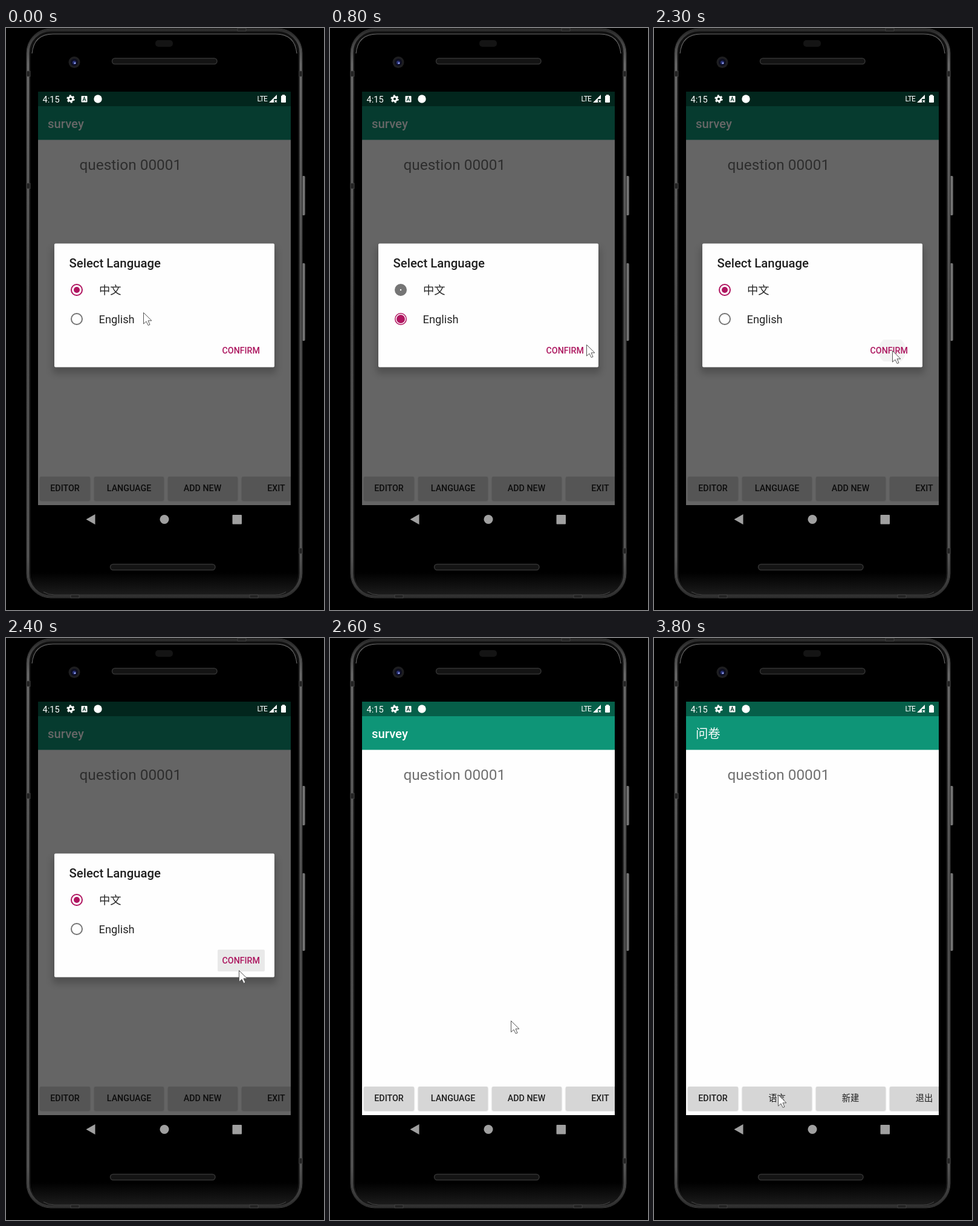
Write an HTML page that moves like this. It is 526x960 px and loops after 3.9 s.

```html
<!DOCTYPE html>
<html lang="en">
<head>
<meta charset="utf-8">
<title>Language dialog</title>
<style>
html, body { margin: 0; width: 100%; height: 100%; overflow: hidden; background: #000; }
svg { display: block; width: 526px; height: 960px; font-family: Roboto, "Noto Sans CJK SC", "Noto Sans CJK", sans-serif; }
.medium { font-weight: 500; }
#buttons text { font-size: 14.25px; font-weight: 500; text-anchor: middle; fill: #1f1f1f; }
#buttons.zh text:not(:first-of-type) { font-weight: 400; }
</style>
</head>
<body>
<svg viewBox="0 0 526 960">
  <defs>
    <linearGradient id="metal" x2="0" y2="1">
      <stop offset="0" stop-color="#2c2c2c"/><stop offset=".06" stop-color="#686868"/>
      <stop offset=".5" stop-color="#4c4c4c"/><stop offset=".93" stop-color="#555"/><stop offset="1" stop-color="#303030"/>
    </linearGradient>
    <linearGradient id="chin" x2="0" y2="1">
      <stop offset="0" stop-color="#000"/><stop offset="1" stop-color="#1b1b1b"/>
    </linearGradient>
    <linearGradient id="key" x2="1" y2="0">
      <stop offset="0" stop-color="#303030"/><stop offset=".5" stop-color="#858585"/><stop offset="1" stop-color="#444"/>
    </linearGradient>
    <clipPath id="screen"><path d="M53 105h418v682H53z"/></clipPath>
    <clipPath id="confirmArea"><rect x="350" y="514" width="78" height="36" rx="2"/></clipPath>
    <filter id="blur" x="-20%" y="-20%" width="140%" height="150%"><feGaussianBlur stdDeviation="6"/></filter>
    <filter id="soft" x="-10%" y="-20%" width="120%" height="150%"><feGaussianBlur stdDeviation="1"/></filter>
  </defs>

  <!-- phone body -->
  <rect x="489.500" y="244" width="5.500" height="65" rx="2" fill="url(#key)"/>
  <rect x="489.500" y="388" width="5.500" height="128" rx="2" fill="url(#key)"/>
  <rect x="34" y="1" width="456" height="939" rx="40" fill="#101010" stroke="#3a3a3a"/>
  <rect x="36.500" y="3.500" width="451" height="934" rx="38" fill="none" stroke="url(#metal)" stroke-width="4"/>
  <rect x="40" y="9" width="444" height="926" rx="36" fill="#000" stroke="#1c1c1c"/>
  <path d="M43 42Q46 10 78 10H446Q478 10 481 42" fill="none" stroke="#6c6c6c" stroke-width="1.200"/>
  <path d="M42 898H483Q482 934 448 934H77Q43 934 42 898" fill="url(#chin)"/>
  <path d="M62 930Q70 935 80 935H445Q456 935 463 930" fill="none" stroke="#484848"/>
  <path d="M34 71h6v9h-6zM34 256h6v9h-6zM485 71h5v9h-5zM485 858h5v9h-5zM383 0h14v5h-14zM107 935h14v5h-14zM403 935h14v5h-14z" fill="#242424" stroke="#4b4b4b" stroke-width=".7"/>
  <rect x="247" y="20" width="29" height="11" rx="5" fill="#141414"/>
  <g fill="#141414" stroke="#333" stroke-width="1.500">
    <rect x="175.500" y="50" width="173.500" height="9.500" rx="4.700"/>
    <rect x="172.500" y="884.500" width="173.500" height="9.500" rx="4.700"/>
  </g>
  <circle cx="113" cy="56.500" r="9.500" fill="#1e1e20"/>
  <circle cx="113" cy="56.500" r="6" fill="#0d0e20"/>
  <circle cx="113" cy="57" r="3" fill="#2a3378"/>
  <circle cx="114" cy="58" r="1.300" fill="#a9b5ff"/>
  <g fill="#a0a0a0">
    <path d="M132.500 810.500L147.500 802V819z"/>
    <circle cx="262" cy="810.500" r="7.500"/>
    <rect x="374.500" y="803" width="15.500" height="15.500" rx="1"/>
  </g>

  <!-- app -->
  <g clip-path="url(#screen)">
    <path d="M53 105h418v682H53z" fill="#fefefe"/>
    <path d="M53 105h418v24H53z" fill="#065f49"/>
    <path d="M53 129h418v55.500H53z" fill="#0e9577"/>
    <text id="title" class="medium" x="69" y="164.500" font-size="20.350" fill="#fff"></text>
    <text x="121.500" y="234" font-size="24.400" fill="#707070">question 00001</text>
    <g id="buttons"></g>
    <path id="dim" d="M53 105h418v682H53z"/>
  </g>

  <!-- status icons -->
  <g fill="#fff">
    <text x="60.500" y="122.500" font-size="14.600">4:15</text>
    <circle cx="107" cy="117" r="3.600" fill="none" stroke="#fff" stroke-width="3"/>
    <circle cx="107" cy="117" r="5.600" fill="none" stroke="#fff" stroke-width="2.200" stroke-dasharray="2.930"/>
    <rect x="124.500" y="112" width="10" height="10.500" rx="1"/>
    <path d="M127 120.500L129.500 114L132 120.500M128 118.500h3" fill="none" stroke="#123c30" stroke-width="1.200"/>
    <circle cx="152" cy="117" r="6.700"/>
    <text x="415.500" y="121" font-size="12" letter-spacing="-.7">LTE</text>
    <path d="M435 123L448 110V117H443V123z"/>
    <path d="M444.500 119l3.500 3.500m0-3.500l-3.500 3.500" stroke="#fff" stroke-width="1.200"/>
    <path d="M457 111.500V110h4v1.500h1q1 0 1 1V122q0 1-1 1h-6q-1 0-1-1v-9.500q0-1 1-1z"/>
  </g>

  <!-- dialog -->
  <g id="dialog">
    <rect x="77" y="362" width="370" height="208" rx="4" opacity=".2" filter="url(#blur)"/>
    <rect x="80" y="355.500" width="364" height="204" rx="2" fill="#fefefe"/>
    <text class="medium" x="104.500" y="394.500" font-size="20.350" fill="#1f1f1f">Select Language</text>
    <g font-size="18.300" fill="#252525">
      <text x="154" y="439">中文</text>
      <text x="153.500" y="486.500">English</text>
    </g>
    <g id="radios"></g>
    <g clip-path="url(#confirmArea)"><circle id="ripple" cx="394" cy="532" fill="#e9e9e9"/></g>
    <text class="medium" x="357.500" y="537" font-size="14.250" fill="#ad1860">CONFIRM</text>
  </g>

  <path id="cursor" d="M.5.5V19L5 15L8.200 21.500L11 20.300L8 13.800H14z" fill="#fff" stroke="#555"/>
</svg>
<script>
const LOOP = 3900, TICK = 100;
const PINK = '#b01560', GRAY = '#757575';
const $ = id => document.getElementById(id);

function add(parent, tag, attrs) {
  const el = document.createElementNS('http://www.w3.org/2000/svg', tag);
  return set(parent.appendChild(el), attrs);
}
function set(el, attrs) {
  for (const name in attrs) el.setAttribute(name, attrs[name]);
  return el;
}

// left, width, text centre, English label, Chinese label
const buttons = [
  [56, 83, 97.5, 'EDITOR', 'EDITOR'],
  [146, 115, 203.5, 'LANGUAGE', '语言'],
  [268, 115, 325, 'ADD NEW', '新建'],
  [390, 115, 447, 'EXIT', '退出']
].map(([x, width, centre, en, zh]) => {
  const box = { x, width, height: 39, rx: 2 };
  add($('buttons'), 'rect', { ...box, y: 741, opacity: .25, filter: 'url(#soft)' });
  add($('buttons'), 'rect', { ...box, y: 740, fill: '#d6d6d6' });
  return { label: add($('buttons'), 'text', { x: centre, y: 764 }), en, zh };
});

const radios = [432, 480].map(cy => ({
  ring: add($('radios'), 'circle', { cx: 117, cy, fill: 'none' }),
  dot: add($('radios'), 'circle', { cx: 117, cy })
}));

// [ring thickness, dot radius] on successive ticks
const CHECK = [[2, 0], [7, 0], [1.5, 7], [2, 5]];
const UNCHECK = [[2, 5], [2, 7], [8.8, 0], [5, 0], [2, 0]];

function drawRadio({ ring, dot }, checked, step) {
  const poses = checked ? CHECK : UNCHECK;
  const [width, radius] = poses[Math.min(step, poses.length - 1)];
  const color = checked ? (step ? PINK : GRAY) : (step < 2 ? PINK : GRAY);
  set(ring, { r: 10 - width / 2, 'stroke-width': width, stroke: color });
  set(dot, { r: radius, fill: color });
}

// time, x, y of the pointer tip
const path = [
  [0, 227, 469], [300, 224, 474], [400, 262, 483], [500, 350, 500], [600, 413, 515],
  [800, 424, 522], [1000, 424, 523], [1200, 411, 537], [1300, 260, 490], [1400, 128, 443],
  [1700, 128, 443], [1800, 132, 444], [1900, 190, 465], [2000, 300, 505], [2100, 388, 538],
  [2300, 394, 532], [2400, 385, 548], [2500, 354, 584], [2600, 299, 631], [2700, 285, 643],
  [3100, 286, 643], [3200, 262, 678], [3300, 228, 715], [3400, 209, 732], [3500, 209, 732],
  [3800, 205, 753]
];

function pointer(t) {
  const i = path.findIndex(p => p[0] >= t);
  if (i < 1) return path[0].slice(1);
  const a = path[i - 1], b = path[i], k = (t - a[0]) / (b[0] - a[0]);
  return [1, 2].map(n => a[n] + (b[n] - a[n]) * k);
}

function draw(t) {
  const zh = t >= 2900;
  $('title').textContent = zh ? '问卷' : 'survey';
  $('title').style.fontWeight = zh ? 400 : 500;
  $('buttons').setAttribute('class', zh ? 'zh' : '');
  for (const b of buttons) b.label.textContent = zh ? b.zh : b.en;

  const second = t >= 1800;
  const step = t < 600 ? 9 : (t - (second ? 1800 : 600)) / TICK;
  const chinese = t < 600 || second;
  drawRadio(radios[0], chinese, step);
  drawRadio(radios[1], !chinese, step);

  const pressed = t >= 2300 && t < 2500;
  set($('ripple'), { r: !pressed ? 0 : t < 2400 ? 23 : 60, opacity: t < 2400 ? .5 : 1 });
  set($('dim'), { opacity: t < 2500 ? .6 : t < 2600 ? .24 : 0 });
  set($('dialog'), { opacity: t < 2500 ? 1 : t < 2600 ? .04 : 0 });
  set($('cursor'), { transform: `translate(${pointer(t)})` });
}

function frame() {
  const t = performance.now() % LOOP;
  draw(Math.floor(t / TICK) * TICK);
  requestAnimationFrame(frame);
}
frame();
</script>
</body>
</html>
```
